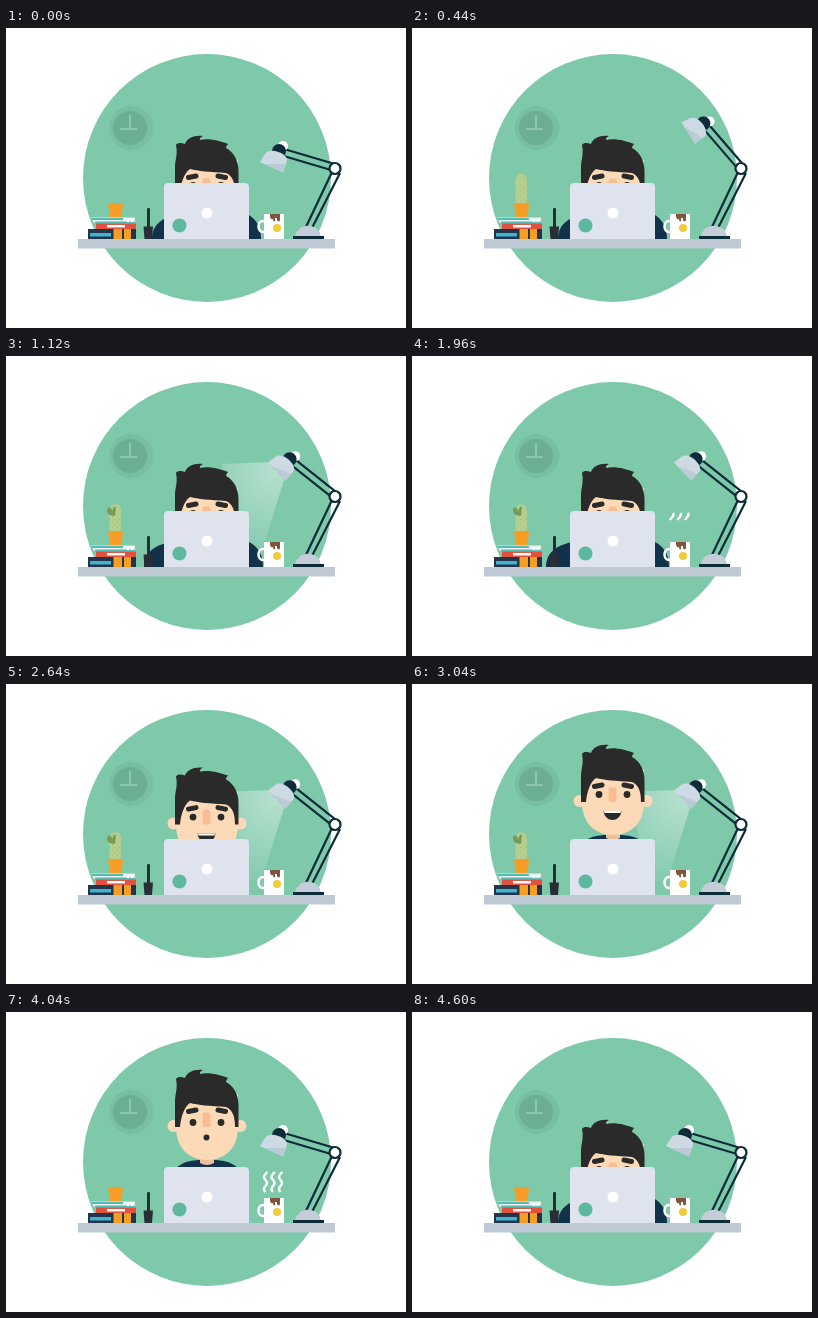
An HTML page that plays this animation: 400x300 px, repeating every 4.64 s.

```html
<!DOCTYPE html>
<html lang="en">
<head>
<meta charset="utf-8">
<title>Desk</title>
<style>
  html, body { margin: 0; width: 100%; height: 100%; overflow: hidden; background: #fff; }
  svg { display: block; width: 100%; height: 100%; }
</style>
</head>
<body>
<svg viewBox="0 0 400 300">
  <defs>
    <radialGradient id="glow" gradientUnits="userSpaceOnUse" cx="272" cy="114" r="94">
      <stop offset="0" stop-color="#fff" stop-opacity=".44"/>
      <stop offset=".5" stop-color="#fff" stop-opacity=".22"/>
      <stop offset="1" stop-color="#fff" stop-opacity="0"/>
    </radialGradient>
    <pattern id="grain" width="5" height="5" patternUnits="userSpaceOnUse">
      <path d="M1 1h1M3.5 3.5h1" stroke="#8fae6c" stroke-width=".8"/>
    </pattern>
  </defs>
  <circle cx="201" cy="150" r="124" fill="#7fc9ab"/>

  <g id="clock">
    <circle cx="125" cy="100" r="22" fill="#78be a1" style="fill:#78bea1"/>
    <circle cx="124" cy="100" r="17" fill="#6bae92"/>
    <path d="M124 87V101M114 101H131" stroke="#8bc7ac" stroke-width="2"/>
  </g>

  <path id="beam" d="M264 106L216 108L226 150L240 196L255 198L278 124Z" fill="url(#glow)"/>

  <g fill="#12314a">
    <path id="armL" d="M44 211H0C0 198 8 190 26 186H44Z"/>
    <path id="armR" d="M-44 211H0C0 200-4 191-14 186H-44Z"/>
  </g>

  <g id="person">
    <path d="M164 170C168 154 184 151 194 151H208C218 151 234 154 238 170Z" fill="#12314a"/>
    <path d="M194 142H208V154Q201 158 194 154Z" fill="#edc19b"/>
    <g fill="#fcdab7">
      <circle cx="167.500" cy="117" r="6"/>
      <circle cx="234.500" cy="117" r="6"/>
      <path d="M170 85H232V118C232 139 219 151 201 151S170 139 170 118Z"/>
    </g>
    <path d="M169 118V92C169 84 172 80 170 70C172 67 176 68 179 69C181 63 188 60 197 61Q193 63 194 65C203 63 214 66 222 69Q220 71 220 73C228 77 232.500 86 232.500 96V118H229C229 108 227 101 220 98C204 97 192 96 184 94C178 98 175 108 174 118Z" fill="#2b2a2b"/>
    <path d="M182.500 102.500L190 101M212 101L219.500 102.500" stroke="#2b2a2b" stroke-width="5" stroke-linecap="round"/>
    <rect x="196.500" y="103.500" width="8" height="14.500" rx="2" fill="#fabd93"/>
    <g id="features" fill="#2b2a2b">
      <circle cx="187" cy="110.500" r="3.400"/>
      <circle cx="215" cy="110.500" r="3.400"/>
      <g id="smile">
        <path d="M191.500 127H209.500C208 139 193 139 191.500 127Z"/>
        <path d="M192 127H209L208.500 129H192.500Z" fill="#fff"/>
      </g>
      <circle id="gasp" cx="200.500" cy="125.500" r="3"/>
    </g>
  </g>

  <g id="laptop">
    <rect x="158" y="155" width="85" height="60" rx="4" fill="#dfe3ed"/>
    <circle cx="201" cy="185" r="5.500" fill="#fff"/>
    <circle cx="173.500" cy="197.500" r="7" fill="#5cb9a0"/>
  </g>

  <g id="pens" fill="#282e36">
    <rect x="141" y="180" width="3" height="20" rx="1"/>
    <path d="M137.500 198.500H147L146 211H138.500Z"/>
  </g>

  <g id="plant">
    <g id="cactus">
      <path d="M103.500 176V155C103.500 146 115 146 115 155V176Z" fill="#b6d08f"/>
      <path d="M103.500 176V155C103.500 146 115 146 115 155V176Z" fill="url(#grain)"/>
      <path id="branch" d="M109 160C102 160 100 156 101.500 152C104 150 106 153 106 155Q109 148 110 152Z" fill="#789c58"/>
    </g>
    <path d="M102 175H117L115.500 189.500H104Z" fill="#f59d24"/>
  </g>

  <g id="books">
    <path d="M85 189.500H129V195H88Z" fill="#e9f1f2"/>
    <path d="M85 190H117V192H86ZM89 193.500H129V195.500H89Z" fill="#55b9b8"/>
    <circle cx="122" cy="192.500" r="1.700" fill="#fff"/>
    <circle cx="126" cy="192.500" r="1.700" fill="#fff"/>
    <rect x="90" y="195.500" width="40" height="5.500" fill="#e2513f"/>
    <path d="M101 198.200H119" stroke="#fff" stroke-width="2.500"/>
    <rect x="82" y="201" width="48" height="10" fill="#22344a"/>
    <rect x="84" y="205" width="21" height="3.500" fill="#3fb3cf"/>
    <path d="M107.500 201H116V211H107.500ZM118 201H125V211H118Z" fill="#f59d24"/>
  </g>

  <g id="cup">
    <ellipse cx="257" cy="198.500" rx="4.500" ry="5.500" fill="none" stroke="#fff" stroke-width="2.500"/>
    <rect x="258" y="186" width="20" height="25" fill="#fff"/>
    <path d="M264 186H274V192Q272.500 195 271 192V190H269V193Q267.500 195 267 191Q265 192 264 189Z" fill="#80553f"/>
    <circle cx="271" cy="200" r="4" fill="#f2cb3b"/>
  </g>
  <g id="steam" fill="none" stroke="#fff" stroke-width="2.400"></g>

  <g id="lamp">
    <g stroke="#0d2b38" stroke-width="2.200">
      <path d="M299.500 200L326.500 143M306 200L334 145"/>
      <g id="shade" stroke="none">
        <path d="M278 121L327 135.500M276 127.500L325 142" stroke="#0d2b38" stroke-width="2.200"/>
        <circle cx="277" cy="118" r="5" fill="#fff"/>
        <circle cx="273" cy="123" r="7" fill="#0d2b38"/>
        <path d="M254 134L259 126C264 118 283 126 281 133L277 144.500Z" fill="#cddae3"/>
        <path d="M258 136L277 144.500L280 136Z" fill="#bccad5"/>
      </g>
      <circle cx="329" cy="140.500" r="5.500" fill="#fff"/>
    </g>
    <path d="M289 209C291 194 313 194 315 209Z" fill="#c5ced8"/>
    <rect x="287" y="208" width="31" height="3" fill="#0d2b38"/>
  </g>

  <rect x="72" y="211" width="257" height="9.500" fill="#bec9d3"/>
</svg>
<script>
const LOOP = 4640;
const el = id => document.getElementById(id);
const clamp = v => Math.min(1, Math.max(0, v));
const ease = v => v * v * (3 - 2 * v);
const show = (id, on) => el(id).setAttribute('visibility', on ? 'visible' : 'hidden');
const move = (id, value) => el(id).setAttribute('transform', value);

// Eased value at time t through [time, value] pairs.
function track(t, keys) {
  let [t0, v0] = keys[0];
  for (const [t1, v1] of keys) {
    if (t < t1) return v0 + (v1 - v0) * ease(clamp((t - t0) / (t1 - t0)));
    [t0, v0] = [t1, v1];
  }
  return v0;
}

const lampKeys = [[120, 0], [420, 33], [700, 22], [3340, 22], [3540, 33], [3840, -3], [4000, 0]];
const cactusKeys = [[100, 0], [420, 1.1], [640, 1], [3380, 1], [3500, 1.1], [3760, 0]];
const branchKeys = [[460, 0], [640, 1.2], [760, 1], [3300, 1], [3440, 0]];
const headKeys = [[2480, 47], [2820, -6], [2980, 0], [3400, 0], [3540, -3], [4060, -3], [4190, -6], [4420, 49], [4560, 47]];
const gazeKeys = [[3400, 0], [3540, 3], [4190, 3], [4420, 0]];
const armKeys = [[440, 12], [1120, 20], [1960, 24], [2360, 24], [2580, -6], [4280, -6], [4480, 12]];
const beamKeys = [[660, 0], [740, 1], [1640, 1], [1720, 0], [2380, 0], [2460, 1], [3300, 1], [3380, 0]];

el('steam').innerHTML = [259.5, 267, 274.5].map(x =>
  `<path pathLength="1" d="M${x} 180q-3-3 0-6t0-6t0-6t1.500-5"/>`).join('');

function drawSteam(t) {
  const u = t % (LOOP / 2);
  const head = clamp((u - 1340) / 430), tail = clamp((u - 1720) / 350);
  show('steam', head > tail);
  el('steam').setAttribute('stroke-dasharray', `0 ${tail} ${head - tail} 2`);
}

function draw(t) {
  move('shade', `rotate(${track(t, lampKeys)} 329 140.5)`);
  const grown = track(t, cactusKeys);
  show('cactus', grown > 0.01);
  move('cactus', `translate(0 176) scale(1 ${grown}) translate(0 -176)`);
  move('branch', `translate(108 158) scale(${track(t, branchKeys)}) translate(-108 -158)`);
  move('person', `translate(0 ${track(t, headKeys)})`);
  move('features', `translate(0 ${track(t, gazeKeys)})`);

  const reach = track(t, armKeys);
  move('armL', `translate(${158 - reach} 0)`);
  move('armR', `translate(${243 + Math.min(reach, 14)} 0)`);

  const happy = t < 3460;
  show('smile', happy);
  show('gasp', !happy);
  el('beam').setAttribute('opacity', track(t, beamKeys));
  drawSteam(t);
}

const start = performance.now();
function frame() {
  draw((performance.now() - start) % LOOP);
  requestAnimationFrame(frame);
}
frame();
</script>
</body>
</html>
```
